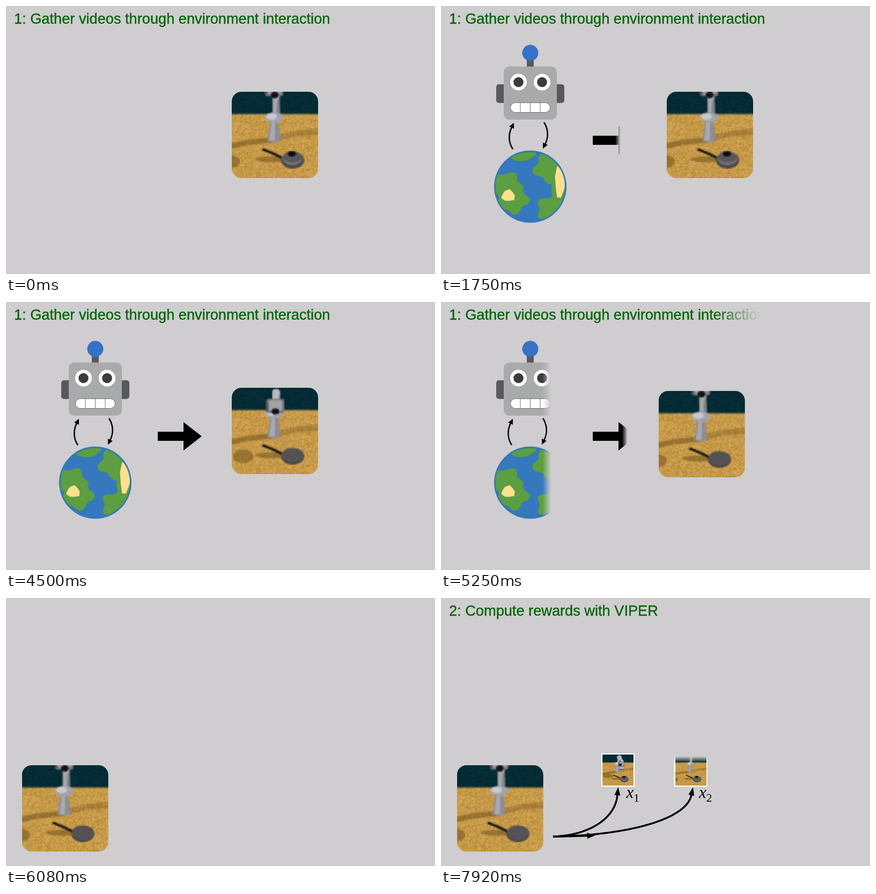
An HTML page with a canvas for the animation above (8 s loop, 800 by 500 pixels).

```html
<!DOCTYPE html>
<html lang="en">
<head>
<meta charset="utf-8">
<title>Video rewards</title>
<style>
  html, body { margin: 0; width: 100%; height: 100%; overflow: hidden; background: #cfcdcf; }
  canvas { display: block; }
</style>
</head>
<body>
<canvas id="stage" width="800" height="500"></canvas>
<script>
const W = 800, H = 500, LOOP = 8000, VIDEO = 161, LOW = 64;

function makeCanvas(w, h) {
  const canvas = document.createElement('canvas');
  canvas.width = w;
  canvas.height = h;
  return canvas;
}

const stage = document.getElementById('stage').getContext('2d');
const layer = makeCanvas(W, H).getContext('2d');
const clamp = v => Math.max(0, Math.min(1, v));
const span = (t, from, duration) => clamp((t - from) / duration);
const ease = p => (1 - Math.cos(Math.PI * p)) / 2;
const mix = (a, b, p) => a + (b - a) * p;
const mixPoint = (a, b, p) => a.map((v, k) => mix(v, b[k], p));

// ---------- shape helpers ----------
function disc(c, x, y, rx, color, ry = rx) {
  c.fillStyle = color;
  c.beginPath();
  c.ellipse(x, y, rx, ry, 0, 0, 2 * Math.PI);
  c.fill();
}

function box(c, x, y, w, h, r, color) {
  c.fillStyle = color;
  c.beginPath();
  c.roundRect(x, y, w, h, r);
  c.fill();
}

function polygon(c, color, points) {
  c.fillStyle = color;
  c.beginPath();
  points.forEach(p => c.lineTo(...p));
  c.closePath();
  c.fill();
}

// Ellipse whose radius swings in and out; few steps give a faceted outline.
function island(c, color, x, y, rx, ry, lobes, steps) {
  const points = Array.from({ length: steps }, (_, i) => {
    const angle = i / steps * 2 * Math.PI;
    const r = 1 + 0.15 * Math.sin(lobes * angle + x);
    return [x + rx * r * Math.cos(angle), y + ry * r * Math.sin(angle)];
  });
  polygon(c, color, points);
}

function limb(c, color, width, ...points) {
  c.strokeStyle = color;
  c.lineWidth = width;
  c.lineCap = c.lineJoin = 'round';
  c.beginPath();
  points.forEach(p => c.lineTo(...p));
  c.stroke();
}

// Cubic curve drawn up to the fraction p, with an arrowhead at its tip.
function curveArrow(c, path, p, width, length, half) {
  if (p <= 0) return;
  const at = u => {
    let points = path;
    while (points.length > 1) points = points.slice(1).map((q, i) => mixPoint(points[i], q, u));
    return points[0];
  };
  c.strokeStyle = '#000';
  c.lineWidth = width;
  c.lineCap = 'butt';
  c.beginPath();
  for (let i = 0; i <= 40; i++) c.lineTo(...at(p * i / 40));
  c.stroke();
  const [x, y] = at(p), [px, py] = at(p - 0.02);
  c.save();
  c.translate(x, y);
  c.rotate(Math.atan2(y - py, x - px));
  polygon(c, '#000', [[-1, -half], [length, 0], [-1, half]]);
  c.restore();
}

// Shows the fraction p of a drawing, with a soft travelling edge.
function wipe(p, [x, y, w, h], upward, draw) {
  if (p <= 0) return;
  if (p >= 1) return draw(stage);
  const size = upward ? h : w;
  const edge = size * p;
  const inner = edge - size * 0.12 * Math.min(1, 20 * (1 - p));
  const fade = upward
    ? layer.createLinearGradient(0, y + h - inner, 0, y + h - edge)
    : layer.createLinearGradient(x + inner, 0, x + edge, 0);
  fade.addColorStop(0, '#000');
  fade.addColorStop(1, 'transparent');
  layer.clearRect(0, 0, W, H);
  draw(layer);
  layer.globalCompositeOperation = 'destination-in';
  layer.fillStyle = fade;
  layer.fillRect(0, 0, W, H);
  layer.globalCompositeOperation = 'source-over';
  stage.drawImage(layer.canvas, 0, 0);
}

// ---------- camera picture of the robot arm ----------
const room = makeCanvas(LOW, LOW);
{
  const c = room.getContext('2d');
  const wall = [5, 43, 52], table = [198, 154, 73];
  let seed = 7;
  const random = () => (seed = seed * 16807 % 2147483647) / 2147483647;
  for (let y = 0; y < LOW; y++) {
    const depth = clamp((y - 15) / 2);
    for (let x = 0; x < LOW; x++) {
      const noise = (random() - 0.5) * mix(8, 32, depth);
      c.fillStyle = `rgb(${mixPoint(wall, table, depth).map(v => v + noise)})`;
      c.fillRect(x, y, 1, 1);
    }
  }
}

// The hand goes down to the pan, lifts the lid and leaves at the top.
const REST = [79, -4], GRASP = [107, 74], LIFT = [81, 35];

function handAt(t) {
  const lowered = mixPoint(REST, GRASP, ease(span(t, 1850, 1350)));
  const lifted = mixPoint(lowered, LIFT, ease(span(t, 3450, 1000)));
  return mixPoint(lifted, REST, ease(span(t, 4550, 550)));
}

function drawPan(c, lid) {
  limb(c, '#1b1a19', 5, [59, 108], [75, 114], [96, 124]);
  disc(c, 113.5, 128, 21.5, '#434144', 15.5);
  disc(c, 113.5, 126, 21, '#555255', 14);
  if (!lid) return;
  disc(c, 113, 124, 18, '#89888c', 11);
  disc(c, 113, 122, 18, '#59575b', 11);
  disc(c, 112, 116, 7.5, '#0d0d0d', 5);
}

function drawArm(c, [hx, hy], reach) {
  const shoulder = [82 + 8 * reach, 8 + 10 * reach];
  const wrist = [hx + 6 * reach, hy - 24 * reach];
  const half = 17 - 2 * reach;

  polygon(c, '#8d8d94', [[72, 52], [86, 52], [91, 92], [78, 95], [66, 91]]);
  polygon(c, '#a9a9b0', [[74, 54], [81, 54], [80, 92], [70, 91]]);
  limb(c, '#85868d', 14, [83, 38], shoulder);
  limb(c, '#a9aab0', 6, [80, 38], shoulder);
  disc(c, 79, 48, 17.5, '#a3a3ab', 9.5);
  disc(c, 74, 46, 10, '#c9c9cf', 6);

  limb(c, '#aaaab0', 13 + 17 * reach, shoulder, [shoulder[0], shoulder[1] + 2 * reach]);
  limb(c, '#b9b9be', 13, shoulder, wrist, [hx, hy]);
  disc(c, shoulder[0] - 17, shoulder[1] - 4, 4 * reach, '#343539', 9 * reach);

  box(c, hx - half, hy - 14, half * 2, 26, 4, '#77767b');
  box(c, hx - half + 5, hy - 12, half * 2 - 9, 20, 3, '#a3a2a7');
  box(c, hx - half - 1, hy - 8, 4, 18, 2, '#4a484b');
  disc(c, hx + 1 - 9 * reach, hy + 10 - 11 * reach, 7, '#141314', 6);

  const w = 36 * reach;
  box(c, hx + 2 - w / 2, hy + 13, w, 22 * reach, 3 * reach, '#98989c');
  box(c, hx + 3 - w / 2, hy + 17, w * 0.85, 6 * reach, 2 * reach, '#d0d0d3');
  box(c, hx + 3 - w / 2, hy + 25, w * 0.9, 4 * reach, reach, '#353538');
}

function drawCamera(c, hand, lid) {
  const reach = clamp((hand[0] - REST[0]) / (GRASP[0] - REST[0]));
  const shade = 'rgba(105, 75, 25, 0.5)', paleShade = 'rgba(105, 75, 25, 0.3)';
  c.setTransform(1, 0, 0, 1, 0, 0);
  c.drawImage(room, 0, 0);
  c.scale(LOW / VIDEO, LOW / VIDEO);
  limb(c, shade, 10, [-5, 102], [30, 94], [75, 90]);
  limb(c, paleShade, 11, [88, 86], [125, 77], [165, 74]);
  disc(c, hand[1] * 0.6, 130 - 28 * reach, 18 + 16 * reach, shade, 12);
  disc(c, 74, 126, 29, shade, 6);
  drawPan(c, lid);
  drawArm(c, hand, reach);
}

function snapshot(hand) {
  const picture = makeCanvas(LOW, LOW);
  drawCamera(picture.getContext('2d'), hand, true);
  return picture;
}
const snapshots = [snapshot(handAt(2700)), snapshot(REST)];
const camera = makeCanvas(LOW, LOW).getContext('2d');

function drawVideo(t) {
  const [x, y] = mixPoint([421, 160], [29.7, 312], ease(span(t, 5137, 900)));
  drawCamera(camera, handAt(t), t < 3600);
  stage.save();
  stage.beginPath();
  stage.roundRect(x, y, VIDEO, VIDEO, 18);
  stage.clip();
  stage.drawImage(camera.canvas, x, y, VIDEO, VIDEO);
  stage.restore();
}

// ---------- illustrations ----------
function drawRobot(c) {
  const dark = '#59585b';
  box(c, 160, 96, 13, 20, 0, dark);
  disc(c, 166.5, 87.5, 15, '#3473c8');
  box(c, 103, 146, 127, 35, 5, dark);
  box(c, 117, 113, 99, 99, 10, '#a9aaab');
  for (const side of [-1, 1]) {
    disc(c, 166.5 + 22 * side, 142, 15.5, '#fff');
    disc(c, 166.5 + 22 * side, 142, 9.3, '#3d3a3e');
  }
  box(c, 129.5, 180.5, 74, 18, 9, '#fff');
  c.strokeStyle = '#747476';
  c.lineWidth = 1;
  for (let i = 1; i < 4; i++) {
    c.moveTo(129.5 + 18.5 * i, 181);
    c.lineTo(129.5 + 18.5 * i, 198);
  }
  c.stroke();
}

function drawEarth(c) {
  const sea = '#3578bd', land = '#5c9e40', sand = '#ffe08e';
  c.save();
  disc(c, 166.5, 337, 67.3, sea);
  c.clip();
  island(c, land, 148, 279, 29, 9, 3, 60);
  island(c, land, 120, 335, 30, 24, 5, 60);
  island(c, land, 133, 360, 29, 26, 5, 60);
  island(c, land, 207, 302, 33, 27, 5, 60);
  island(c, land, 224, 345, 16, 34, 3, 60);
  island(c, land, 209, 378, 29, 24, 5, 60);
  island(c, sand, 222, 328, 10, 30, 3, 9);
  island(c, sand, 125.5, 354, 12.5, 11, 3, 9);
  c.strokeStyle = sea;
  c.lineWidth = 5;
  c.beginPath();
  c.arc(166.5, 337, 67, 0, 2 * Math.PI);
  c.stroke();
  c.restore();
}

// Two equal arrows, half a turn apart.
function drawCycle(c) {
  c.save();
  c.translate(163, 242);
  for (let i = 0; i < 2; i++) {
    curveArrow(c, [[29, -25], [38, -11], [37, 4], [31, 16]], 1, 2.6, 9, 5);
    c.rotate(Math.PI);
  }
  c.restore();
}

function drawBigArrow(c) {
  box(c, 283, 242, 49, 17, 0, '#000');
  polygon(c, '#000', [[331, 224], [365, 250.5], [331, 277]]);
}

function drawTitle(c, text) {
  c.font = '27.2px "Liberation Sans", Arial, sans-serif';
  c.fillStyle = c.strokeStyle = '#006400';
  c.lineWidth = 0.35;
  c.fillText(text, 15, 33);
  c.strokeText(text, 15, 33);
}

function drawSample(c, index) {
  const x = 299 + 135.5 * index;
  box(c, x, 290, 62, 62, 0, '#fff');
  c.drawImage(snapshots[index], x + 2, 292, 58, 58);
  c.fillStyle = '#000';
  c.font = 'italic 31px "Liberation Serif", Times, serif';
  c.fillText('x', x + 46.5, 373);
  c.font = '22px "Liberation Serif", Times, serif';
  c.fillText(index + 1, x + 60, 380);
}

// ---------- timeline ----------
function drawFirstSlide(t) {
  const remaining = 1 - span(t, 5040, 1000);
  const leaving = ease(span(t, 5137, 900));
  wipe(remaining, [16, 0, 734, 50], false, c => drawTitle(c, '1: Gather videos through environment interaction'));
  wipe(Math.min(span(t, 60, 1000), remaining), [99, 72, 135, 333], false, c => {
    drawRobot(c);
    drawEarth(c);
  });
  stage.save();
  stage.globalAlpha = 1 - leaving;
  stage.translate(-50 * leaving, 0);
  wipe(span(t, 300, 800), [125, 215, 75, 53], false, drawCycle);
  stage.restore();
  wipe(Math.min(span(t, 1120, 1000), remaining), [283, 224, 82, 53], false, drawBigArrow);
}

function drawSecondSlide(t) {
  wipe(span(t, 6100, 850), [14, 0, 390, 50], false, c => drawTitle(c, '2: Compute rewards with VIPER'));
  for (let i = 0; i < 3; i++) {
    const start = 6430 + 710 * i;
    const tip = 329 + 138 * i, reach = tip - 209;
    const path = [[209, 445], [209 + reach * 0.55, 443], [tip - reach * 0.03, 412], [tip, 367]];
    curveArrow(stage, path, span(t, start, 700), 3.4, 14, 5.5);
    if (i < 2) wipe(span(t, start + 310, 500), [tip - 30, 290, 75, 92], true, c => drawSample(c, i));
  }
}

function render(t) {
  stage.fillStyle = '#cfcdcf';
  stage.fillRect(0, 0, W, H);
  if (t < 6040) drawFirstSlide(t);
  else drawSecondSlide(t);
  drawVideo(t);
}

const begin = performance.now();
function tick() {
  render((performance.now() - begin) % LOOP);
  requestAnimationFrame(tick);
}
tick();
</script>
</body>
</html>
```
